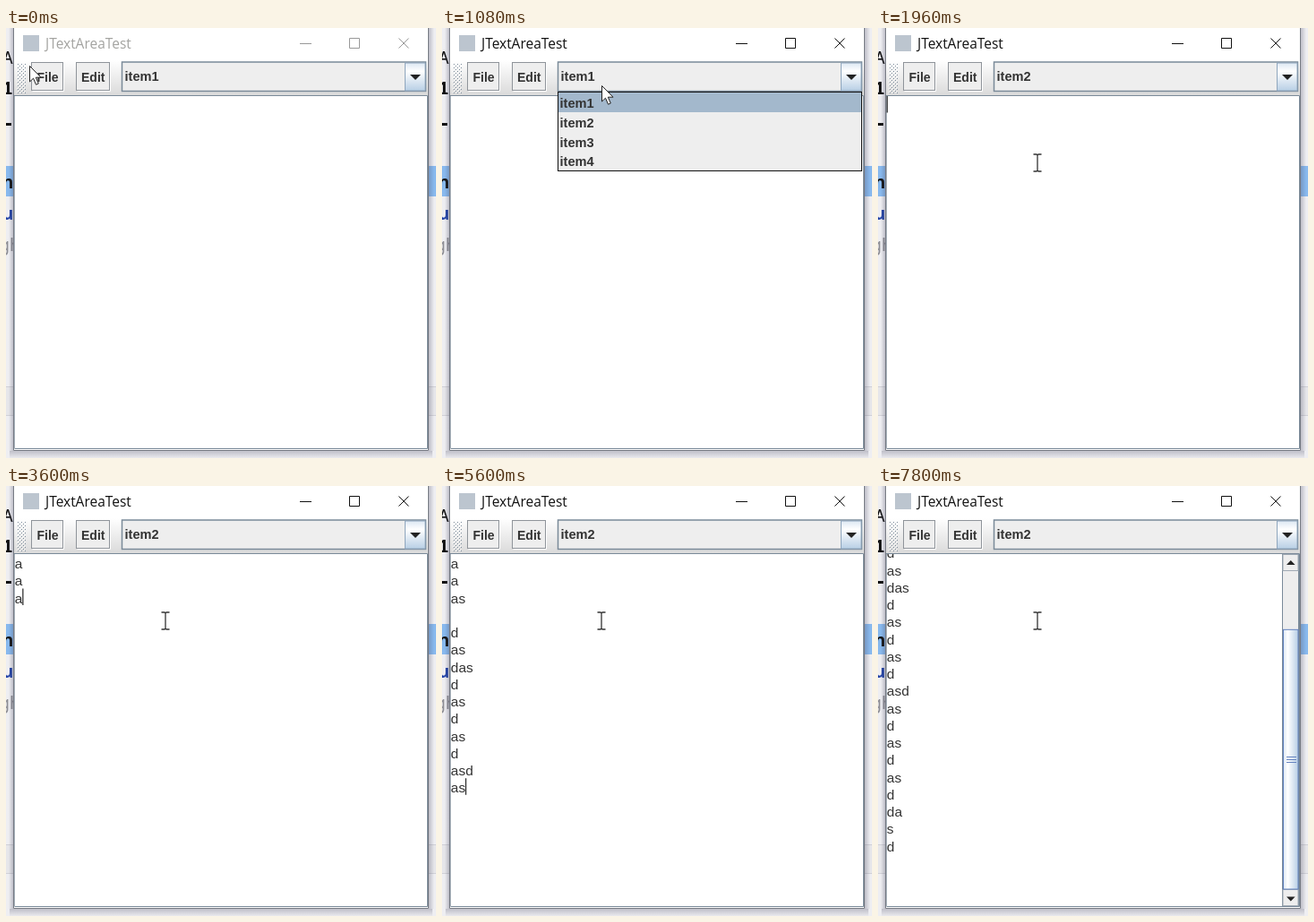
These frames come from a looping animation (480x480 px, 8000 ms). An HTML page:

```html
<!DOCTYPE html>
<html lang="en">
<head>
<meta charset="utf-8">
<title>JTextAreaTest</title>
<style>
  html, body { margin: 0; width: 100%; height: 100%; overflow: hidden; background: #eeeef2; }
  svg { display: block; width: 480px; height: 480px; }
  text { white-space: pre; }
  .ui { font: bold 14px "Liberation Sans", Arial, sans-serif; fill: #333; }
  .item { font-size: 14.6px; }
  .code { font: bold 20px "Noto Sans Mono", monospace; fill: #111; }
  .area { font: 15.5px "Liberation Sans", Arial, sans-serif; fill: #333; }
  .title { font: 15.5px "Open Sans", "Noto Sans", sans-serif; }
</style>
</head>
<body>
<svg id="stage" viewBox="0 0 480 480">
  <defs>
    <linearGradient id="bar" x2="0" y2="1">
      <stop offset="0" stop-color="#fff"/><stop offset="1" stop-color="#dadada"/>
    </linearGradient>
    <linearGradient id="knob" x2="0" y2="1">
      <stop offset="0" stop-color="#dde8f3"/><stop offset=".3" stop-color="#fff"/><stop offset="1" stop-color="#b8cfe5"/>
    </linearGradient>
    <linearGradient id="thumbFill">
      <stop offset="0" stop-color="#dde8f3"/><stop offset=".3" stop-color="#fff"/><stop offset="1" stop-color="#b8cfe5"/>
    </linearGradient>
    <linearGradient id="shade">
      <stop offset="0" stop-color="#505068" stop-opacity=".3"/><stop offset="1" stop-color="#505068" stop-opacity="0"/>
    </linearGradient>
    <linearGradient id="shadeDown" x2="0" y2="1">
      <stop offset="0" stop-color="#505068" stop-opacity=".3"/><stop offset="1" stop-color="#505068" stop-opacity=".03"/>
    </linearGradient>
    <pattern id="bumps" x="12" y="39" width="4" height="4" patternUnits="userSpaceOnUse">
      <path d="M0 0h1v1h-1zM2 2h1v1h-1z" fill="#fff"/>
      <path d="M1 1h1v1h-1zM3 3h1v1h-1z" fill="#7a8a99"/>
    </pattern>
    <clipPath id="view"><rect x="9" y="76" width="461" height="393"/></clipPath>
  </defs>

  <!-- page behind the window -->
  <rect width="480" height="480" fill="#eeeef2"/>
  <rect y="400" width="480" height="32" fill="#e6e6ea"/>
  <path d="M0 400.5h480M0 432.5h480" stroke="#d0d0d6"/>
  <rect y="154" width="480" height="34" fill="#88b9ee"/>
  <g class="code">
    <text x="-4" y="40" font-weight="normal">A</text>
    <text x="-4" y="74">1</text>
    <rect y="106" width="6" height="3"/>
    <text x="-4" y="179">n</text>
    <text x="-4" y="214" style="fill:#2344a8">u</text>
    <text x="-8" y="249" style="fill:#8c8c92;font-weight:normal">gh</text>
  </g>
  <rect x="472" width="6" height="472" fill="url(#shade)"/>
  <rect x="3" width="5" height="472" fill="url(#shade)" transform="matrix(-1 0 0 1 11 0)"/>
  <rect x="4" y="472" width="472" height="8" fill="url(#shadeDown)"/>

  <!-- window frame -->
  <path d="M8.5-1V471.5H471.5V-1" fill="#fff" stroke="#777b84"/>
  <rect x="19" y="8" width="18" height="18" fill="#bcc5cf"/>
  <text id="title" class="title" x="44" y="22.5">JTextAreaTest</text>
  <path id="buttons" d="M328 17.5h13M383.5 11.5h11v11h-11zM438.5 11.5l11 11M449.5 11.5l-11 11" fill="none"/>

  <!-- toolbar -->
  <rect x="9" y="36" width="462" height="39" fill="url(#bar)"/>
  <rect x="12" y="39" width="10" height="34" fill="url(#bumps)"/>
  <g fill="#eee" stroke="#8f949a">
    <rect x="28.5" y="38.5" width="35" height="31"/>
    <rect x="78.5" y="38.5" width="37" height="31"/>
  </g>
  <path d="M29.5 70.5h35v-32M79.5 70.5h37v-32" fill="none" stroke="#fff"/>
  <text class="ui" x="34.5" y="60">File</text>
  <text class="ui" x="84" y="60">Edit</text>
  <rect x="129.5" y="38" width="339" height="32.5" fill="#eee" stroke="#7a8a99" stroke-width="1.5"/>
  <rect id="focus" x="131" y="39.5" width="314" height="29.5" fill="#a3b8cc"/>
  <rect x="445.5" y="39" width="22.5" height="31" fill="url(#knob)" stroke="#8fa6bd"/>
  <path d="M451 52h12l-6 6z" fill="#222"/>
  <text id="choice" class="ui item" x="132.5" y="59"></text>

  <!-- text area -->
  <path d="M9 75.5h461.5v394h-461" fill="none" stroke="#7a8a99"/>
  <path d="M9.5 76v393" stroke="#a4aeb8"/>
  <g clip-path="url(#view)">
    <g id="doc" class="area"><rect id="caret" width="1.3" height="18.5" fill="#333"/></g>
  </g>

  <g id="scroll">
    <rect x="451.5" y="76" width="18" height="393" fill="#eee" stroke="#7a8a99"/>
    <rect x="452" y="76.5" width="17" height="18" fill="#eee" stroke="#a0aab4"/>
    <rect x="452" y="450.5" width="17" height="18" fill="#eee" stroke="#a0aab4"/>
    <path d="M456 88h9.6l-4.8-5zM456 458.5h9.6l-4.8 5z" fill="#222"/>
    <rect id="thumb" x="452.5" width="16.5" fill="url(#thumbFill)" stroke="#6382bf"/>
    <path id="ridges" d="M456-2.5h11M456 .5h11M456 3.5h11" stroke="#6382bf"/>
  </g>

  <g id="popup">
    <rect x="129.5" y="71.5" width="339" height="88" fill="#eee" stroke="#111"/>
    <rect id="hover" x="130" width="338" height="22" fill="#a3b8cc"/>
  </g>

  <path id="arrow" d="M.5 .5v17.5l4-3.8 3 7 2.8-1.2-3-6.8h5.7z" fill="#fff" stroke="#222"/>
  <path id="beam" d="M-4.5-9.5h3.5l1 1 1-1h3.5M-4.5 9.5h3.5l1-1 1 1h3.5M0-9v18" fill="none" stroke="#333" stroke-width="1.3"/>
</svg>
<script>
const LOOP = 8000, LINE = 19.25, TOP = 76, VIEW = 393.5, MAX_LINES = 25, FONT = 15.5;
const ACTIVATE = 80, OPEN = 960, PICK = 1660, FOCUS = 1910, BLINK = 500;
const $ = id => document.getElementById(id);

// typing bursts: start, ms per key, keys
const bursts = [
  [3240, 80, "a\na\na"],
  [3720, 160, "s\n"],
  [4080, 45, "\nd\nas\ndas\nd\nas\nd"],
  [4920, 56, "\nas\nd\nasd\nas"],
  [5640, 50, "\nd"],
  [5800, 52, "\nas\nd\nas\nd\nda\ns\n"],
  [6840, 140, "d\n\n\n"]
];
const keys = bursts.flatMap(([start, gap, s]) => [...s].map((ch, i) => [start + i * gap, ch]));

// pointer path: time, x, y
const path = [[0, 26, 42], [880, 178, 64], [1080, 178, 64],
              [1500, 178, 106], [1660, 178, 106], [1880, 178, 150], [LOOP, 178, 150]];

function add(parent, cls, x, y, str) {
  const el = document.createElementNS("http://www.w3.org/2000/svg", "text");
  el.setAttribute("class", cls);
  el.setAttribute("x", x);
  el.setAttribute("y", y);
  el.textContent = str;
  parent.append(el);
  return el;
}
for (let i = 0; i < 4; i++) add($("popup"), "ui item", 131.5, 89 + i * 21.8, "item" + (i + 1));
const rows = Array.from({ length: MAX_LINES }, (_, i) => add($("doc"), "area", 9.8, 92 + i * LINE, ""));

const set = (id, attrs) => { for (const k in attrs) $(id).setAttribute(k, attrs[k]); };
const show = (id, on) => set(id, { visibility: on ? "visible" : "hidden" });
const advance = { a: 0.556, d: 0.556, s: 0.5 };

function pointer(t) {
  const i = path.findIndex(p => p[0] > t);
  const [t0, x0, y0] = path[i - 1], [t1, x1, y1] = path[i];
  const u = (t - t0) / (t1 - t0), k = u * u * (3 - 2 * u);
  return [Math.round(x0 + (x1 - x0) * k), Math.round(y0 + (y1 - y0) * k)];
}

function drawText(t) {
  const typed = keys.filter(k => k[0] <= t);
  const lines = typed.map(k => k[1]).join("").split("\n");
  rows.forEach((row, i) => { row.textContent = lines[i] || ""; });

  const n = lines.length, height = n * LINE + 1;
  const over = Math.max(0, height - VIEW);
  set("doc", { transform: `translate(0 ${-over})` });

  const last = typed.length ? typed[typed.length - 1][0] : FOCUS;
  const width = [...lines[n - 1]].reduce((w, c) => w + advance[c] * FONT, 0);
  set("caret", { x: 9.6 + width, y: TOP + (n - 1) * LINE });
  show("caret", t >= FOCUS && Math.floor((t - last) / BLINK) % 2 === 0);

  show("scroll", over > 0);
  const size = 355 * Math.min(1, VIEW / height);
  set("thumb", { y: 450 - size, height: size });
  set("ridges", { transform: `translate(0 ${Math.round(450 - size / 2)})` });
}

function draw(t) {
  const [x, y] = pointer(t), active = t >= ACTIVATE, picked = t >= PICK;
  set("title", { fill: active ? "#111" : "#a3a3a0" });
  set("buttons", { stroke: active ? "#111" : "#999" });
  $("choice").textContent = picked ? "item2" : "item1";
  show("focus", picked && t < FOCUS);
  show("popup", t >= OPEN && !picked);
  set("hover", { y: 72 + 22 * Math.max(0, Math.floor((y - 72) / 22)) });

  const inText = picked && y > TOP;
  set("arrow", { transform: `translate(${x} ${y})` });
  set("beam", { transform: `translate(${x} ${y + 0.5})` });
  show("arrow", !inText);
  show("beam", inText);
  drawText(t);
}

const begin = performance.now();
function tick() {
  draw((performance.now() - begin) % LOOP);
  requestAnimationFrame(tick);
}
tick();
</script>
</body>
</html>
```
